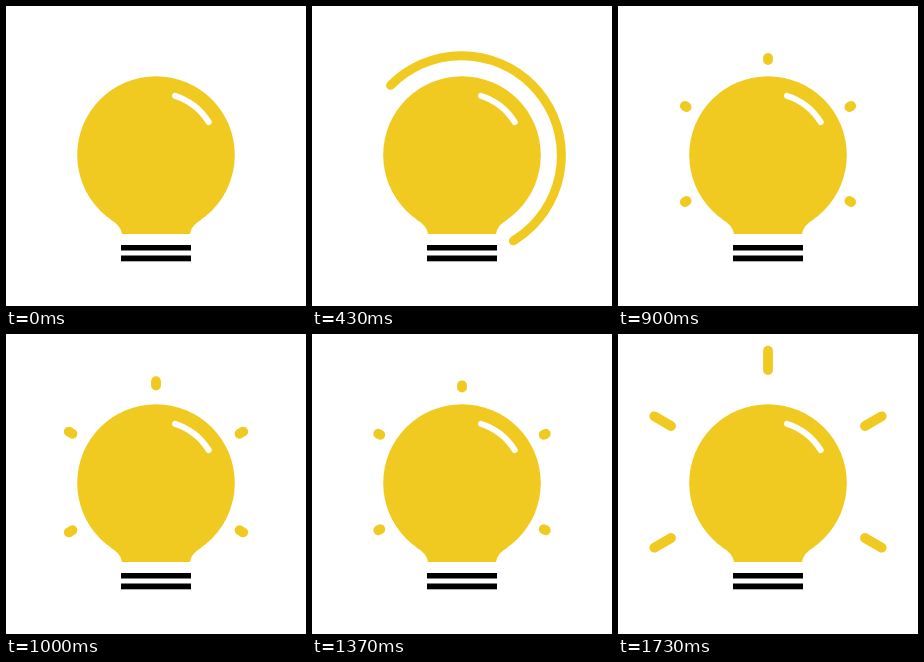
Write an HTML page with a canvas that moves like this. It is 300 px wide and 300 px high and loops after 2.16 s.

```html
<!DOCTYPE html>
<html>
<head>
<meta charset="utf-8">
<title>Light bulb</title>
<style>
  html, body { margin: 0; width: 100%; height: 100%; overflow: hidden; background: #fff; }
  canvas { display: block; }
</style>
</head>
<body>
<canvas id="stage" width="300" height="300"></canvas>
<script>
const LOOP = 2160, FPS = 30, YELLOW = '#f0ca20';
const ctx = document.getElementById('stage').getContext('2d');
ctx.lineCap = 'round';

const mix = (a, b, k) => a + (b - a) * k;

// Eased progress between two frames
function ease(frame, from, to) {
  const x = Math.min(1, Math.max(0, (frame - from) / (to - from)));
  return x * x * (3 - 2 * x);
}

// Angles in degrees, clockwise from the top
const rad = deg => (deg - 90) * Math.PI / 180;

function arc(x, y, radius, from, to, width, color) {
  ctx.beginPath();
  ctx.arc(x, y, radius, rad(from), rad(to));
  ctx.lineWidth = width;
  ctx.strokeStyle = color;
  ctx.stroke();
}

function drawBulb() {
  ctx.fillStyle = YELLOW;
  ctx.beginPath();
  ctx.arc(150, 149, 78.8, 0, 2 * Math.PI);
  ctx.fill();
  ctx.fill(new Path2D('M104 213Q115 219.5 116 228H184Q185 219.5 196 213Z'));
  arc(150, 149, 62.2, 17.8, 58, 6, '#fff');
  ctx.fillStyle = '#000';
  ctx.fillRect(115, 239, 70, 5.5);
  ctx.fillRect(115, 249.5, 70, 5.8);
}

function drawSweep(frame) {
  const head = ease(frame, 0, 14), tail = ease(frame, 9, 19);
  if (head > tail) {
    arc(149.6, 149.5, 99.8, mix(206.8, 513.2, tail), mix(206.8, 513.2, head), 9, YELLOW);
  }
}

function drawRays(frame) {
  if (frame < 27) return;
  const k = frame <= 40 ? ease(frame, 27, 40) : ease(frame, 40, 52);
  const inner = mix(94, 112, k), outer = mix(96, 131.3, k);
  ctx.lineWidth = 9.8;
  ctx.strokeStyle = YELLOW;
  for (const deg of [-120, -60, 0, 60, 120]) {
    const dx = Math.cos(rad(deg)), dy = Math.sin(rad(deg));
    ctx.beginPath();
    ctx.moveTo(150 + dx * inner, 148 + dy * inner);
    ctx.lineTo(150 + dx * outer, 148 + dy * outer);
    ctx.stroke();
  }
}

function draw() {
  const time = performance.now() % LOOP;
  const frame = Math.floor((time + 3.4) * FPS / 1000);
  ctx.fillStyle = '#fff';
  ctx.fillRect(0, 0, 300, 300);
  drawBulb();
  drawSweep(frame);
  drawRays(frame);
  requestAnimationFrame(draw);
}
draw();
</script>
</body>
</html>
```
